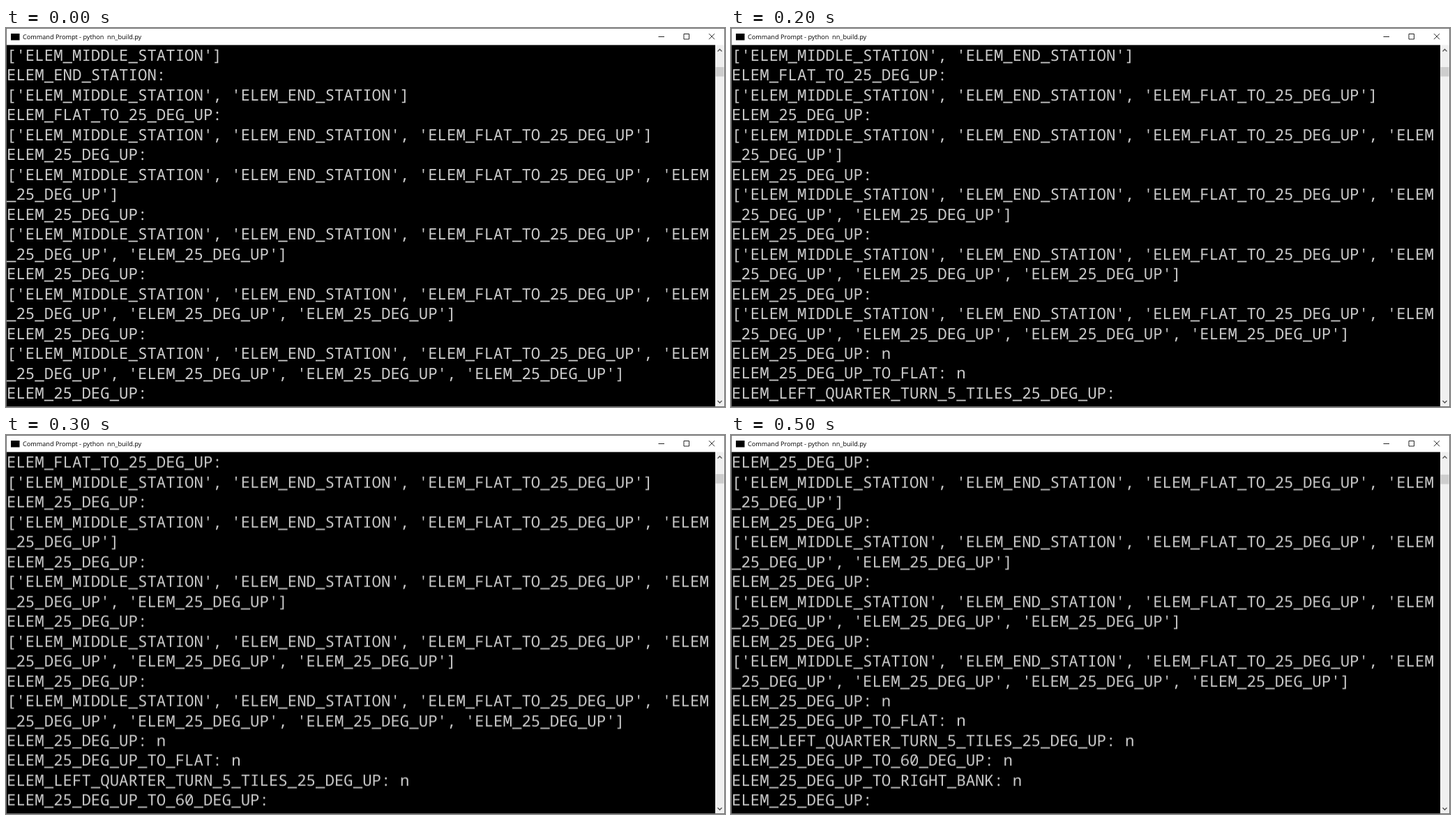
Recreate the animation shown at these times as an HTML page. Size 1031x543 px, loop 0.6 s.

```html
<!DOCTYPE html>
<html lang="en">
<head>
<meta charset="utf-8">
<title>Command Prompt</title>
<style>
  html, body { margin: 0; width: 100%; height: 100%; overflow: hidden; background: #fff; }
  svg { display: block; }
  text { white-space: pre; text-rendering: geometricPrecision; }
  .console text { font: 22.38px "Noto Sans Mono", monospace; fill: #ccc; }
  .title { font: 9.14px "Open Sans", sans-serif; fill: #000; }
  .scroll { animation: scroll 600ms steps(6, end) infinite; }
  .thumb { animation: thumb 600ms step-end infinite; }
  .line { fill: none; stroke: #000; stroke-width: .85; }
  .arrow { fill: none; stroke: #505050; stroke-width: 1.3; }
  @keyframes scroll { to { transform: translateY(-170.82px); } }
  @keyframes thumb { 66.667% { transform: translateY(.8px); } }
</style>
</head>
<body>
<svg width="1031" height="543" viewBox="0 0 1031 543">
  <rect y="24" width="1017" height="519" />
  <g class="console">
    <svg width="1017" height="541"><g id="output" class="scroll"></g></svg>
    <!-- An answer shows only once its row has left the bottom line. -->
    <svg width="1017" height="512"><g id="answers" class="scroll"></g></svg>
  </g>

  <rect width="1031" height="24.4" fill="#fff" />
  <rect x="7" y="8" width="12.5" height="9.5" />
  <text class="title" x="24" y="16.2">Command Prompt - python  nn_build.py</text>
  <path class="line" d="M935.5 12.5h8.5 M972 8.5h7.5v7.5h-7.5z M1008 8.2l8 8m0-8l-8 8" />

  <rect x="1017" y="24.4" width="13" height="518" fill="#f0f0f0" />
  <rect class="thumb" x="1017.5" y="56" width="12" height="13.5" fill="#cdcdcd" />
  <path class="arrow" d="M1020.5 33.5l3-3 3 3 M1020.5 534l3 3 3-3" />
  <rect x=".5" y=".5" width="1030" height="542" fill="none" stroke="#707070" />
</svg>
<script>
  const COLUMNS = 75, CHAR = 13.428, ROW = 28.47, LEFT = 1, BASELINE = 47;
  const output = document.getElementById('output');
  const answers = document.getElementById('answers');
  let row = 0;

  function addText(parent, column, content) {
    const node = document.createElementNS('http://www.w3.org/2000/svg', 'text');
    node.setAttribute('x', LEFT + column * CHAR);
    node.setAttribute('y', BASELINE + row * ROW);
    node.textContent = content;
    parent.append(node);
  }

  function print(content) {
    for (let i = 0; i < content.length; i += COLUMNS) {
      addText(output, 0, content.slice(i, i + COLUMNS));
      row++;
    }
  }

  function printList(names) {
    print('[' + names.map(name => `'ELEM_${name}'`).join(', ') + ']');
  }

  const track = ['MIDDLE_STATION'];
  printList(track);
  const accepted = ['END_STATION', 'FLAT_TO_25_DEG_UP', ...Array(4).fill('25_DEG_UP')];
  for (const name of accepted) {
    print(`ELEM_${name}:`);
    track.push(name);
    printList(track);
  }

  const rejected = ['25_DEG_UP', '25_DEG_UP_TO_FLAT', 'LEFT_QUARTER_TURN_5_TILES_25_DEG_UP',
    '25_DEG_UP_TO_60_DEG_UP', '25_DEG_UP_TO_RIGHT_BANK'];
  for (const name of rejected) {
    const prompt = `ELEM_${name}:`;
    addText(answers, prompt.length + 1, 'n');
    print(prompt);
  }
  print('ELEM_25_DEG_UP:');
</script>
</body>
</html>
```
